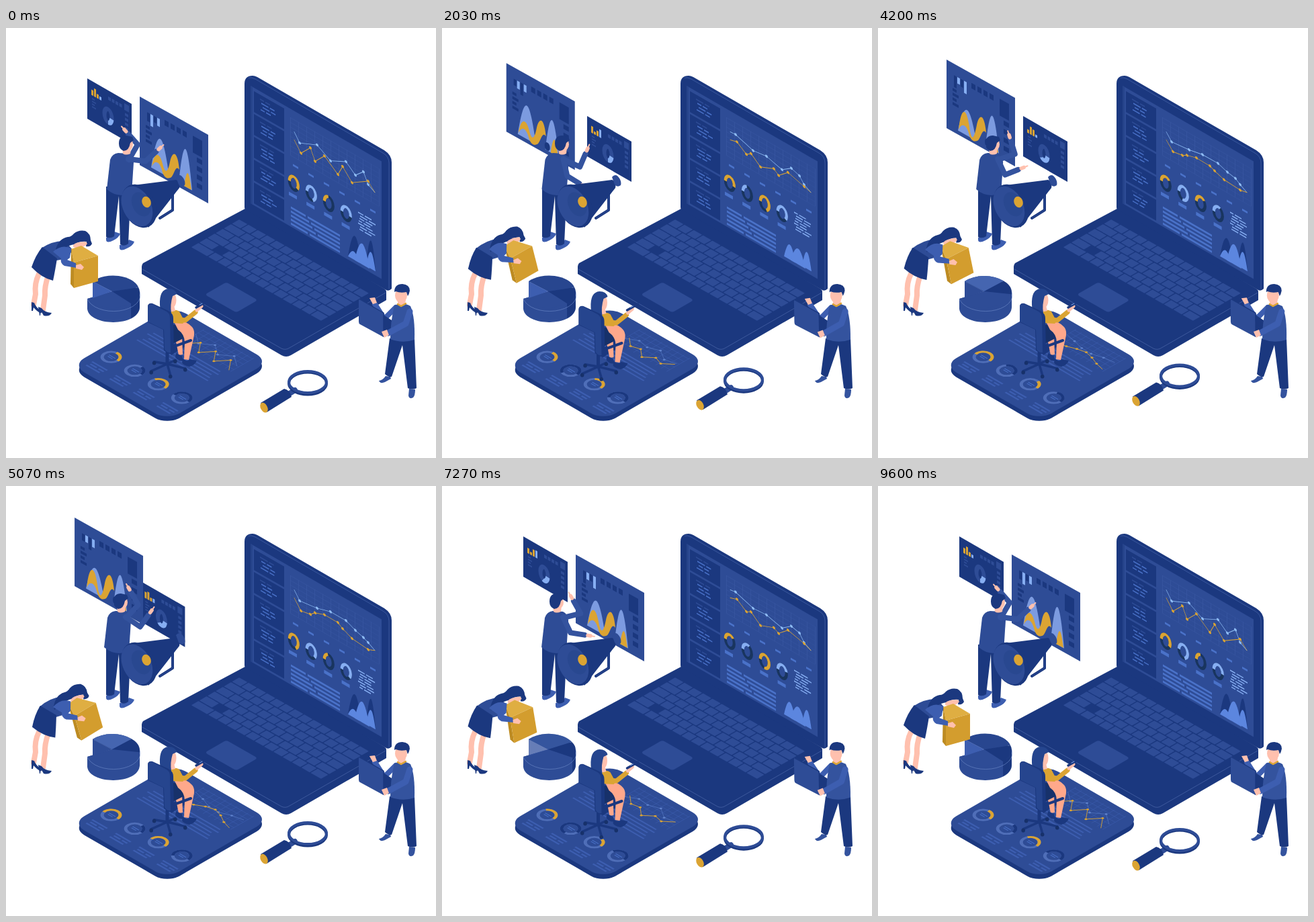
Recreate the animation shown at these times as an HTML page. Size 640 by 640 pixels, loop 9630 ms.

```html
<!DOCTYPE html>
<html lang="en">
<head>
<meta charset="utf-8">
<title>Data team</title>
<style>
html, body { margin: 0; width: 100%; height: 100%; overflow: hidden; background: #fff; }
svg { display: block; width: 100%; height: 100%; }
</style>
</head>
<body>
<svg id="stage" viewBox="0 0 640 640"></svg>
<script>
const LOOP = 9630;
const D = '#1b387f', M = '#2e4c96', L = '#3d5eb0', B = '#4a72c9', P = '#86aef2',
      Y = '#dba433', S = '#ffc0ae', LEG = '#ffa88b', N = '#17316a', T = '#34539e';

// ---- markup helpers ----
const path = (d, fill, more = '') => `<path d="${d}" fill="${fill}" ${more}/>`;
const line = (d, col, w) =>
  path(d, 'none', `stroke="${col}" stroke-width="${w}" stroke-linecap="round" stroke-linejoin="round"`);
const poly = (pts, fill) => `<polygon points="${pts}" fill="${fill}"/>`;
const rect = (x, y, w, h, fill, r = 0) =>
  `<rect x="${x}" y="${y}" width="${w}" height="${h}" rx="${r}" fill="${fill}"/>`;
const oval = (x, y, rx, ry, fill, more = '') =>
  `<ellipse cx="${x}" cy="${y}" rx="${rx}" ry="${ry}" fill="${fill}" ${more}/>`;
const group = (transform, body, id = '') => `<g id="${id}" transform="${transform}">${body}</g>`;
const range = (n, f) => Array.from({ length: n }, (_, i) => f(i)).join('');
const onOval = (x, y, rx, ry, deg) => {
  const a = deg * Math.PI / 180;
  return [x + rx * Math.cos(a), y + ry * Math.sin(a)];
};
const ring = (x, y, rx, ry, w, base, col, from, sweep) =>
  oval(x, y, rx, ry, 'none', `stroke="${base}" stroke-width="${w}"`) +
  path(`M${onOval(x, y, rx, ry, from)}A${rx} ${ry} 0 ${sweep > 180 ? 1 : 0} 1 ${onOval(x, y, rx, ry, from + sweep)}`,
    'none', `stroke="${col}" stroke-width="${w}"`);
const hump = (x0, x1, y, peak, fill) => {
  const c = (peak - y / 4) / .75, w = (x1 - x0) * .36;
  return path(`M${x0} ${y}C${x0 + w} ${c} ${x1 - w} ${c} ${x1} ${y}Z`, fill);
};
const chart = (pts, col, r, w) => line('M' + pts.join('L'), col, w) +
  pts.slice(1, -1).map(([x, y]) => oval(x, y, r, r, col)).join('');

// ---- timing helpers ----
const turn = t => 2 * Math.PI * t / LOOP;
const wave = (t, cycles) => (1 - Math.cos(cycles * turn(t))) / 2;
const track = (t, keys) => {
  let i = 0;
  while (i < keys.length - 2 && t >= keys[i + 1][0]) i++;
  const [a, ...u] = keys[i], [b, ...v] = keys[i + 1];
  const p = Math.min(1, Math.max(0, (t - a) / (b - a))), e = (1 - Math.cos(Math.PI * p)) / 2;
  return u.map((x, j) => x + (v[j] - x) * e);
};
const pulse = t => track(t, [[0, 0], [2030, 0], [3300, 1], [5070, 1], [6270, 0], [8200, .9], [LOOP, 0]])[0];
// chart points drift between a zigzag and an arch
const wobble = (t, i, n) => Math.cos(2 * turn(t)) *
  ((i % 2 ? -1 : 1) * Math.cos(turn(t) / 2) ** 2 + Math.cos(2 * Math.PI * i / (n - 1)) * Math.sin(turn(t) / 2));
const dial = (t, i) => 180 + 100 * Math.cos(2 * turn(t) - 1.2 + i * 2);

// ---- scene ----
const bigPanel = () => poly('0,0 102,57 102,159 0,102', M) + group('matrix(1 .56 0 1 0 0)',
  range(4, i => rect(37 + i * 9, 14, 6, 8, D)) + rect(79, 14, 14, 25, D) +
  range(4, i => rect(9, 37 + i * 7, i % 2 ? 9 : 6, 4, D) + rect(85, 43 + i * 12.5, 8, 7, D)) + '<g id="bigData"></g>');

const smallPanel = () => poly('0,0 66,38 66,98 0,60', D) + group('matrix(1 .576 0 1 0 0)',
  range(4, i => rect(31 + i * 5.5, 9, 4, 5, M) + rect(7, 25 + i * 4, i % 2 ? 6 : 4, 2, M) + rect(56, 19 + i * 7, 5, 4, M)) +
  rect(55, 5, 7, 10, M) + '<g id="smallData"></g>');

const presenter = () =>
  path('M149 312Q158 309 161 303L170 306Q168 312 160 316Q150 321 149 316Z', L) +
  path('M169 323Q180 322 183 315L191 318Q189 324 180 328Q170 333 169 328Z', L) +
  path('M149 236L149 311Q155 314 161 310L168 250L170 322Q176 326 182 321L186 236Z', D) +
  group('', path('M148 240L153 196Q156 187 165 186L180 187Q187 190 188 200L185 246Q164 254 148 240Z', M), 'body') +
  '<g id="arms"></g>' + group('',
  path('M165 178L178 178L177 187Q170 190 166 187Z', S) + oval(173, 173, 8, 10, S) +
  path('M160 172Q160 160 171 160L180 162L182 167L177 171Q175 183 167 183Q160 180 160 172Z', D), 'head') +
  line('M229 283L248 271V246', D, 4) + line('M229 283L248 271V246', M, 1) +
  path('M182 235L253 226Q260 228 258 238L212 297Z', D) +
  path('M253 222Q257 217 261 220Q268 227 266 234Q261 238 257 233Z', M) +
  group('rotate(-26 198 265)', oval(198, 265, 24, 34, D) + oval(195, 264, 21, 31.5, M) + oval(202, 264, 13, 19, '#294890')) +
  oval(209, 259, 6.5, 8.5, Y, 'transform="rotate(-20 209 259)"');

const keys = () => range(6, r => range(14, c => {
  const x = c * 16 - (c ? (r * 5) % 11 : 0);
  return r === 4 && c === 2 ? '' : rect(x + 1, r * 14 + 1, c === 13 ? 223 - x : 14.4, 12.3, M, 1);
}));

const laptop = () =>
  path('M202 355V366L410 487Q417 491 424 487L566 405V392L418 470Z', D) +
  path('M204 350L352 271Q358 267 364 270L563 388Q569 392 563 396L422 476Q416 480 410 477L204 359Q200 355 204 350Z', D) +
  line('M203 359L410 477Q416 480 422 476L565 394', '#5470b0', .6) +
  group('matrix(.866 .492 -.866 .5 347 284)', keys() + rect(84, 106, 54, 37, M, 4)) +
  path('M355 83Q355 71 367 71Q370 71 374 73L563 182Q574 189 574 200L574 388Q570 392 566 390L357 271Q355 270 355 267Z', D) +
  line('M361 74Q365 73 371 76L561 186Q570 191 570 201V388', '#4564ab', .7) +
  group('matrix(1 .577 0 1 364 86)', rect(0, 0, 195, 175, M) + rect(0, 0, 3, 175, '#26448b') +
    range(5, i => rect(5, 5 + i * 34, 45, 31, D)) +
    range(12, i => rect(59 + i * 12, 13, .5, 56, '#3d5ba5')) +
    range(9, i => rect(59, 13 + i * 7, 132, .4, '#3a58a3')) +
    range(6, i => rect(63 + i * 23, 80, 8, 3, B)) +
    range(4, i => rect(57 + i * 26.2, 124.5, 12, 5, B)) +
    range(5, i => {
      const w = 22 + i * 5 % 17;
      return rect(60, 145 + i * 6, w, 3, B) + rect(63 + w, 145 + i * 6, 70 - w, 3, B);
    }) + '<g id="screen"></g>');

const ISO = 'matrix(.866 .5 -.866 .5 249.6 414.4)';
const floorPad = () =>
  group('translate(0 7)', group(ISO, rect(0, 0, 164, 175, D, 21))) +
  group(ISO, rect(0, 0, 164, 175, M, 21) +
    range(5, i => rect(18 + i % 3 * 4, 80 - i * 6, 122 - i % 3 * 7, 2.2, L)) +
    range(10, i => rect(60 + i * 9.5, 8, .5, 40, L)) + range(5, i => rect(60, 10 + i * 8, 86, .5, L)) +
    range(4, i => {
      const x = 12 + i * 40.5;
      return rect(x, 151, 26, 2.6, L) + rect(x + 2, 156, 11, 2.6, L) + rect(x + 16, 156, 9, 2.6, L) + rect(x, 161, 23, 2.6, L);
    }) + '<g id="floor"></g>');

const sitter = () =>
  range(5, i => {
    const [x, y] = onOval(240, 507, 27, 12, 8 + i * 72);
    return line(`M240 500L${x} ${y - 2}`, D, 3.5) + oval(x, y, 2.8, 2.8, N);
  }) + line('M240 480V500', D, 5) +
  path('M245 474L266 460L277 465Q276 470 258 479L246 487Z', D) +
  path('M252 462L262 458L263 486L257 487Z', LEG) + path('M253 484L262 488L264 495Q257 497 252 490Z', D) +
  path('M245 441L260 443Q270 455 264 462L246 471Z', N) +
  path('M250 437Q266 433 277 445Q282 451 279 462L272 494L265 493L266 468Q266 456 256 449Z', LEG) +
  path('M263 492Q269 498 274 493L284 495Q281 502 273 504Q264 502 262 498Z', D) +
  path('M243 423Q251 417 258 422L266 437L263 440L245 439Z', Y) +
  line('M250 433L267 435L282 423', Y, 7) + line('M284 420L291 414', S, 5) +
  line('M283 416L299 407', D, 3.5) + line('M288 412L292 410', P, 1) +
  path('M243 413L250 413L252 421L243 423Z', S) + oval(248, 405, 5.5, 11, S) +
  path('M229 412Q228 389 242 388Q252 388 254 396L248 399Q244 412 246 424L233 423Q229 419 229 412Z', '#25458e') +
  path('M211 415Q211 409 218 410L242 421Q249 425 249 432L250 481Q249 488 241 484L235 480L234 449L211 438Z', D) +
  path('M211 414Q212 409 218 411L239 422Q244 425 244 431L245 483Q239 484 236 478L235 449L211 437Z', '#26458e') +
  line('M250 474L275 465', D, 4);

const stoop = () =>
  line('M49 366Q42 380 44 396L41 412', S, 8) + line('M63 368Q57 385 58 398L55 420', S, 8) +
  path('M38 408L42 409Q44 416 54 422Q53 427 45 420L41 416L40 421H38Z', D) +
  path('M48 415L53 417Q57 423 68 424Q65 430 56 428L52 421L51 428H50Z', D) +
  group('', path('M52 328Q70 316 88 317L99 330L92 343L75 346Z', M) +
    path('M38 356Q44 338 54 326L76 343Q73 362 70 376Q53 372 38 356Z', D) +
    path('M74 329Q79 313 92 311Q97 311 101 306Q108 300 118 302Q126 306 126 316L128 321Q126 326 119 325L120 318Q110 317 102 322Q94 323 86 328Q80 331 74 335Z', D) +
    path('M100 323Q104 318 119 318L121 321Q116 327 107 328L100 326Z', S), 'stoopBody') +
  group('', poly('97,329 112,324 137,339 101,349', '#dfae42') + poly('97,329 101,349 101,387 96,381', '#bd8b22') +
    poly('101,349 137,339 137,377 101,387', '#d39d2e'), 'crate') +
  group('', path('M70 333Q83 321 97 328L95 342L91 345L104 350L105 357L87 354Q80 350 82 343Z', L) +
    path('M104 353L111 351L116 356L113 360L104 358Z', S), 'stoopArm');

const holder = () =>
  path('M572 519L565 518Q561 524 555 525Q557 530 564 527L573 522Z', T) +
  path('M600 537L609 538Q609 547 606 550Q600 553 599 547Z', T) +
  path('M571 462L564 515Q569 520 574 519L590 472L598 536Q605 539 611 536L608 462Z', D) +
  group('', line('M580 416L563 433L549 411', L, 8) + path('M541 402L549 401L552 409L546 411Z', S) +
    poly('562,427 580,439 573,451 562,457', D) +
    path('M578 413Q590 407 602 414Q609 430 608 464Q590 470 572 463Q572 438 578 413Z', T) +
    path('M525 406Q525 403 528 404L562 424V460L527 441Q525 440 525 437Z', M) + line('M527 404L562 424V459', D, 1.4) +
    line('M601 422L595 440L569 454', L, 9) + path('M559 452L567 449L570 457L563 461Z', S) +
    path('M583 404H595L594 412L588 415L583 411Z', S) + line('M583 411L588 414L595 410', Y, 2.5) +
    oval(588, 398, 9, 11, S) + path('M578 393Q578 381 590 381Q601 382 601 391Q600 396 598 399L596 393Q587 395 580 392Z', D), 'holderTop');

const magnifier = () =>
  line('M414 549L430 539', M, 8) +
  path('M379 558L414 537Q422 538 425 549L388 572Z', D) + oval(384, 565, 5, 8, Y, 'transform="rotate(-28 384 565)"') +
  oval(449, 529, 28, 16.5, 'none', `stroke="${D}" stroke-width="4"`) +
  oval(449, 527, 28, 16, 'none', `stroke="${M}" stroke-width="4"`);

const stage = document.getElementById('stage');
stage.innerHTML = group('', smallPanel(), 'small') + group('', bigPanel(), 'big') + presenter() +
  laptop() + floorPad() + group('', sitter(), 'sitter') + '<g id="pie"></g>' + stoop() +
  group('', magnifier(), 'lens') + holder();

// ---- per-frame updates ----
const node = id => document.getElementById(id);
const place = (id, tr) => node(id).setAttribute('transform', tr);
const fill = (id, html) => { node(id).innerHTML = html; };

function panels(t) {
  place('big', `translate(${track(t, [[0, 199, 102], [900, 199, 102], [1750, 89, 58], [2300, 102, 47],
    [5050, 102, 47], [6400, 199, 102], [LOOP, 199, 102]])})`);
  place('small', `translate(${track(t, [[0, 121, 75], [750, 121, 75], [1000, 106, 86], [1700, 202, 141],
    [2000, 216, 131], [4900, 216, 131], [5090, 200, 142], [5850, 95, 94], [7050, 121, 75], [LOOP, 121, 75]])})`);
  const k = pulse(t), low = 73 - 12 * k;
  fill('bigData',
    range(4, i => rect(11 + i * 5, 17, 4, 13 + 5 * Math.sin(i * 2 + 3 * turn(t)), i % 2 ? P : D)) +
    hump(17, 44, 96, 46 + 12 * k, '#7c9be0') + hump(58, 78, 96, 40 + 8 * wave(t, 3), '#7c9be0') +
    path(`M18 94C22 ${low - 6} 30 ${low - 6} 34 81S42 89 45 72S56 46 59 76C53 70 51 90 46 95S36 101 33 91S23 80 18 94Z`, Y) +
    hump(66, 77, 96, 74, Y) + oval(61, 90, 4, 6, D));
  fill('smallData', range(4, i => {
    const h = 8 + 4 * Math.sin(i * 1.8 + 2 * turn(t));
    return rect(6 + i * 4, 21 - h, 3, h, i === 3 ? P : Y);
  }) + ring(31, 38, 5.5, 10, 6, M, P, 10, 80 + 40 * k));
}

// bend a two-part arm so that it reaches the hand
function arm(sx, sy, x, y) {
  const upper = 26, lower = 30, d = Math.min(upper + lower - .1, Math.hypot(x - sx, y - sy));
  const dir = Math.atan2(y - sy, x - sx);
  const bend = Math.acos((upper ** 2 + d ** 2 - lower ** 2) / (2 * upper * d));
  const ex = sx + upper * Math.cos(dir + bend), ey = sy + upper * Math.sin(dir + bend);
  const len = Math.hypot(x - ex, y - ey), ux = (x - ex) / len, uy = (y - ey) / len;
  return line(`M${sx} ${sy}L${ex} ${ey}L${x - ux * 9} ${y - uy * 9}`, T, 8) +
    line(`M${x - ux * 4} ${y - uy * 4}L${x} ${y}`, S, 5.5) + line(`M${x} ${y}l${ux * 6} ${uy * 6}`, S, 2);
}

function presenterPose(t) {
  const lean = 2 * Math.cos(turn(t));
  const [nod] = track(t, [[0, 8], [2100, 8], [2900, 0], [8500, 0], [LOOP, 8]]);
  const near = track(t, [[0, 176, 151], [2030, 217, 179], [3330, 208, 167], [5070, 182, 151], [6270, 185, 153],
    [8270, 198, 174], [LOOP, 176, 151]]);
  const far = track(t, [[0, 230, 178], [2030, 212, 236], [3330, 217, 230], [5070, 217, 185], [6270, 221, 222],
    [8270, 221, 224], [LOOP, 230, 178]]);
  place('body', `translate(${lean} 0)`);
  place('head', `translate(${nod} 0)`);
  fill('arms', arm(181 + lean, 196, ...near) + arm(180 + lean, 195, ...far));
}

function screen(t) {
  const k = wave(t, 2), light = '#5c86df';
  const gold = [75, 89, 96, 110, 130, 137, 151, 175], blue = [73, 99, 119, 142, 156, 168];
  const plot = (xs, mid, amp) => xs.map((x, i) => [x, mid + amp * wobble(t, i, xs.length)]);
  fill('screen',
    range(5, i => range(4, j => {
      const w = 6 + 6 * wave(t + i * 700 + j * 1100, 3), x = 14 + j * 7 % 5, y = 11 + i * 34 + j * 5;
      return rect(x, y, w, 1.7, j ? B : M) + rect(x + w + 2, y, 7, 1.7, j ? B : M);
    })) +
    range(4, i => ring(64.3 + i * 26, 108, 6.5, 9.7, 4.2, '#19355f', i % 2 ? P : Y, 180, dial(t, i))) +
    range(7, j => {
      const w = 8 + 3 * Math.sin(4 * turn(t) + j * 1.7), x = 160 + j * 3 % 4;
      return rect(x, 95 + j * 4, w, 1.6, P) + rect(x + w + 2, 95 + j * 4, 10, 1.6, P);
    }) +
    hump(145, 165, 170, 134 + 22 * k, D) + hump(172, 186, 168, 127 + 20 * k, D) +
    hump(145, 162, 170, 158 - 11 * k, light) + hump(155, 177, 170, 139 + 8 * k, light) + hump(172, 186, 169, 144, light) +
    chart([[65, 31], ...plot(blue, 37, 6), [175, 46], [185, 52]], '#8fbdf5', 2, .8) +
    chart([[65, 43], ...plot(gold, 49, 8), [185, 52]], Y, 2, .8));
}

function floor(t) {
  const sweeps = [100 + 90 * pulse(t), dial(t, 2), dial(t, 0) - 60, dial(t, 3)];
  const plot = (n, from, step, mid, amp) => Array.from({ length: n }, (_, i) =>
    [from + i * step, mid + amp * wobble(t, i, n)]);
  fill('floor', sweeps.map((s, i) => {
    const x = 21.5 + i * 40.5, y = 129;
    return ring(x, y, 11, 11, 4, '#4f6eb8', i % 2 ? D : Y, -s, s) + rect(x - 5, y - 2, 11, 1.3, B) + rect(x - 4, y + 1, 8, 1.3, B);
  }).join('') + chart(plot(6, 60, 16.5, 28, -6), '#5f82cc', 1.7, .5) + chart(plot(7, 64, 13, 39, 8), Y, 1.8, .8));
}

function pie(t) {
  const k = pulse(t), from = -18 - 28 * k, to = 48 - 40 * k;
  const p = onOval(160, 393, 39, 23, from), q = onOval(160, 393, 39, 23, to);
  const wedge = `M158 392L129 377A39 23 0 0 1 ${p}Z`;
  fill('pie', path('M121 403V418C124 445 199 445 199 415V393L158 392Z', M) +
    path(`M${q}V${q[1] + 22}A39 23 0 0 0 199 415V393A39 23 0 0 1 ${q}Z`, D) +
    path('M158 392L129 377A39 23 0 1 1 121 403Z', M) +
    path('M121 403A39 23 0 0 0 199 393', 'none', 'stroke="#6f8cca" stroke-width=".6"') +
    path(wedge, '#28468f') + path(wedge, '#4565b0', `opacity="${k}"`) +
    path(`M158 392L${p}A39 23 0 0 1 ${q}Z`, D) + path('M129 377V402L158 392Z', L, `opacity="${1 - k}"`) +
    path('M129 377V402L158 392Z', M, `opacity="${k}"`));
}

function people(t) {
  const k = wave(t, 3);
  place('stoopBody', `rotate(${-8 * k} 60 350)`);
  place('stoopArm', `translate(${2.5 * k} ${-3 * k}) rotate(${-8 * k} 60 350)`);
  place('crate', `translate(${4.3 * k} ${-13 * k}) rotate(${-17 * k} 119 363)`);
  const [s] = track(t % (LOOP / 2), [[0, 0], [700, 0], [1450, 1], [2500, 1], [3550, 0], [LOOP / 2, 0]]);
  place('sitter', `translate(${-7.5 * s} ${4 * s})`);
  place('holderTop', `rotate(${-1.2 * wave(t, 2)} 590 464)`);
  place('lens', `translate(0 ${-10 * wave(t, 1)})`);
}

function frame() {
  const t = performance.now() % LOOP;
  for (const part of [panels, presenterPose, screen, floor, pie, people]) part(t);
  requestAnimationFrame(frame);
}
frame();
</script>
</body>
</html>
```
